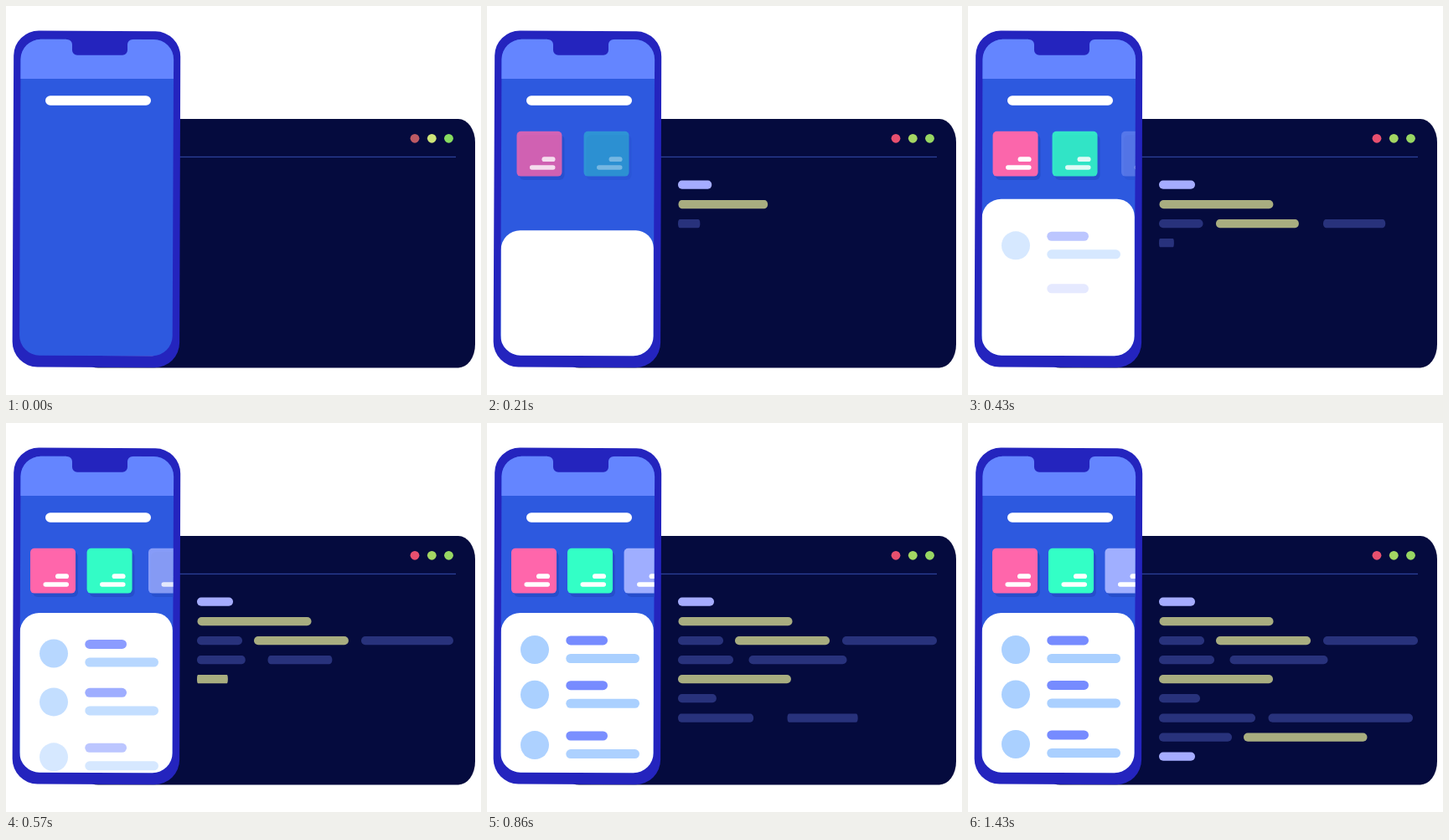
An HTML page with a canvas for the animation above (2.43 s loop, 567x465 px).

```html
<!DOCTYPE html>
<html lang="en">
<head>
<meta charset="utf-8">
<title>App and code</title>
<style>
html, body { margin: 0; width: 100%; height: 100%; overflow: hidden; background: #fff; }
canvas { display: block; width: 567px; height: 465px; }
</style>
</head>
<body>
<canvas id="stage" width="567" height="465"></canvas>
<script>
const ctx = document.getElementById('stage').getContext('2d');
const LOOP = 2430, LAST = 20;
const FRAME = '#2424be', WINDOW = '#050b3e', SCREEN = '#2d59df', HEADER = '#6485ff';
const NAVY = '#28327c', OLIVE = '#a8ad80', LILAC = '#a5acff';
const INDIGO = '#768bff', SKY = '#aad0ff';

// Code bars in typing order: x, y, width, colour
const code = [
  [228, 208.5, 43, LILAC],
  [228.5, 232, 136, OLIVE],
  [228, 255, 54, NAVY], [296, 255, 113, OLIVE], [424, 255, 113, NAVY],
  [228, 278, 66, NAVY], [312.5, 278, 117, NAVY],
  [228, 301, 136, OLIVE],
  [228, 324, 49, NAVY],
  [228, 347.5, 115, NAVY], [358.5, 347.5, 172.5, NAVY],
  [228, 370.5, 87, NAVY], [329, 370.5, 147.5, OLIVE],
  [228, 393.5, 43, LILAC]
];
// Cards: x, start, colour
const cards = [[29, 0, '#ff66ab'], [96, 4, '#33ffc6'], [163.5, 9, '#a0afff']];
// List rows: centre y, start
const rows = [[271, 8], [324.5, 10], [384, 12]];

const easeOut = (n, start, len) =>
  1 - (1 - Math.min(1, Math.max(0, (n - start) / len))) ** 3;

function box(x, y, w, h, r, color) {
  ctx.fillStyle = color;
  ctx.beginPath();
  ctx.roundRect(x, y, w, h, r);
  ctx.fill();
}

function disc(x, y, r, color) {
  ctx.fillStyle = color;
  ctx.beginPath();
  ctx.arc(x, y, r, 0, Math.PI * 2);
  ctx.fill();
}

// Rounded polygon path through the given corners
function blob(pts, r) {
  const [ax, ay] = pts[0], [bx, by] = pts[pts.length - 1];
  ctx.beginPath();
  ctx.moveTo((ax + bx) / 2, (ay + by) / 2);
  pts.forEach(([x, y], i) => {
    const [nx, ny] = pts[(i + 1) % pts.length];
    ctx.arcTo(x, y, nx, ny, r);
  });
  ctx.closePath();
}

function drawWindow(n) {
  const big = { x: 20, y: 28 };
  box(90, 135, 470, 297.5, [0, big, big, 20], WINDOW);
  ctx.fillStyle = '#2c3f98';
  ctx.fillRect(200, 179.8, 337, 1.3);
  const lit = n > 0;
  disc(488, 158.3, 5.4, lit ? '#e8506f' : '#bd5a64');
  disc(508.3, 158.3, 5.4, lit ? '#a4d663' : '#cfe57a');
  disc(528.5, 158.3, 5.4, lit ? '#98d763' : '#88dc60');
  code.forEach(([x, y, w, color], i) => {
    const e = easeOut(n, i * 2, 10);
    if (e > 0) box(x, y, w * e, 10.3, { x: 5 * e, y: 5 }, color);
  });
}

function drawCard(n, [x, start, color]) {
  const e = easeOut(n, start, 15);
  const left = x + 30 * (1 - e);
  ctx.globalAlpha = e;
  box(left + 3, 154, 54, 54, 6, '#264ecb');
  box(left, 149.8, 54, 53.8, 5, color);
  box(left + 30, 180.3, 16, 5.8, 2.9, '#fff');
  box(left + 15.5, 190.3, 30.5, 5.4, 2.7, '#fff');
  ctx.globalAlpha = 1;
}

function drawRow(n, [y, start]) {
  const e = easeOut(n, start, 15);
  const cy = y + 30 * (1 - e);
  ctx.globalAlpha = e;
  box(94.3, cy - 16.6, 49.7, 11, 5.5, INDIGO);
  if (e > 0.25) {
    disc(57, cy, 17, SKY);
    box(94.3, cy + 5, 87.7, 11, 5.5, SKY);
  }
  ctx.globalAlpha = 1;
}

function drawNotch() {
  ctx.fillStyle = FRAME;
  ctx.beginPath();
  ctx.moveTo(72, 38);
  ctx.lineTo(72, 40);
  ctx.arcTo(79, 40, 79, 46, 6);
  ctx.arcTo(79, 58.7, 86, 58.7, 6);
  ctx.arcTo(145, 58.7, 145, 52, 6);
  ctx.arcTo(145, 40, 152, 40, 6);
  ctx.lineTo(152, 40);
  ctx.lineTo(152, 38);
  ctx.fill();
}

function drawPhone(n) {
  ctx.fillStyle = FRAME;
  blob([[9.3, 29.3], [208.3, 30.5], [207, 432.5], [7.5, 431.3]], 30);
  ctx.fill();

  ctx.save();
  blob([[17.6, 39.8], [200.2, 40], [198.6, 418.4], [16, 417.6]], 24);
  ctx.clip();
  ctx.fillStyle = SCREEN;
  ctx.fillRect(0, 30, 220, 400);
  ctx.fillStyle = HEADER;
  ctx.fillRect(0, 30, 220, 57);
  box(47, 107.2, 126, 11.6, 5.8, '#fff');
  cards.forEach(c => drawCard(n, c));
  const top = 418.5 - 191.5 * easeOut(n, 0, 15);
  box(16.6, top, 182.2, 230, [23, 21, 0, 0], '#fff');
  rows.forEach(r => drawRow(n, r));
  ctx.restore();

  drawNotch();
}

// The picture holds for about 70 ms, sampling a 25 fps timeline
function ticks(ms) {
  let k = LAST;
  while (k > 0 && Math.round(k * 7.14) * 10 > ms) k--;
  return Math.ceil(k * 25 / 14);
}

const begin = performance.now();
function draw() {
  const n = ticks((performance.now() - begin) % LOOP);
  ctx.fillStyle = '#fff';
  ctx.fillRect(0, 0, 567, 465);
  drawWindow(n);
  drawPhone(n);
  requestAnimationFrame(draw);
}
draw();
</script>
</body>
</html>
```
